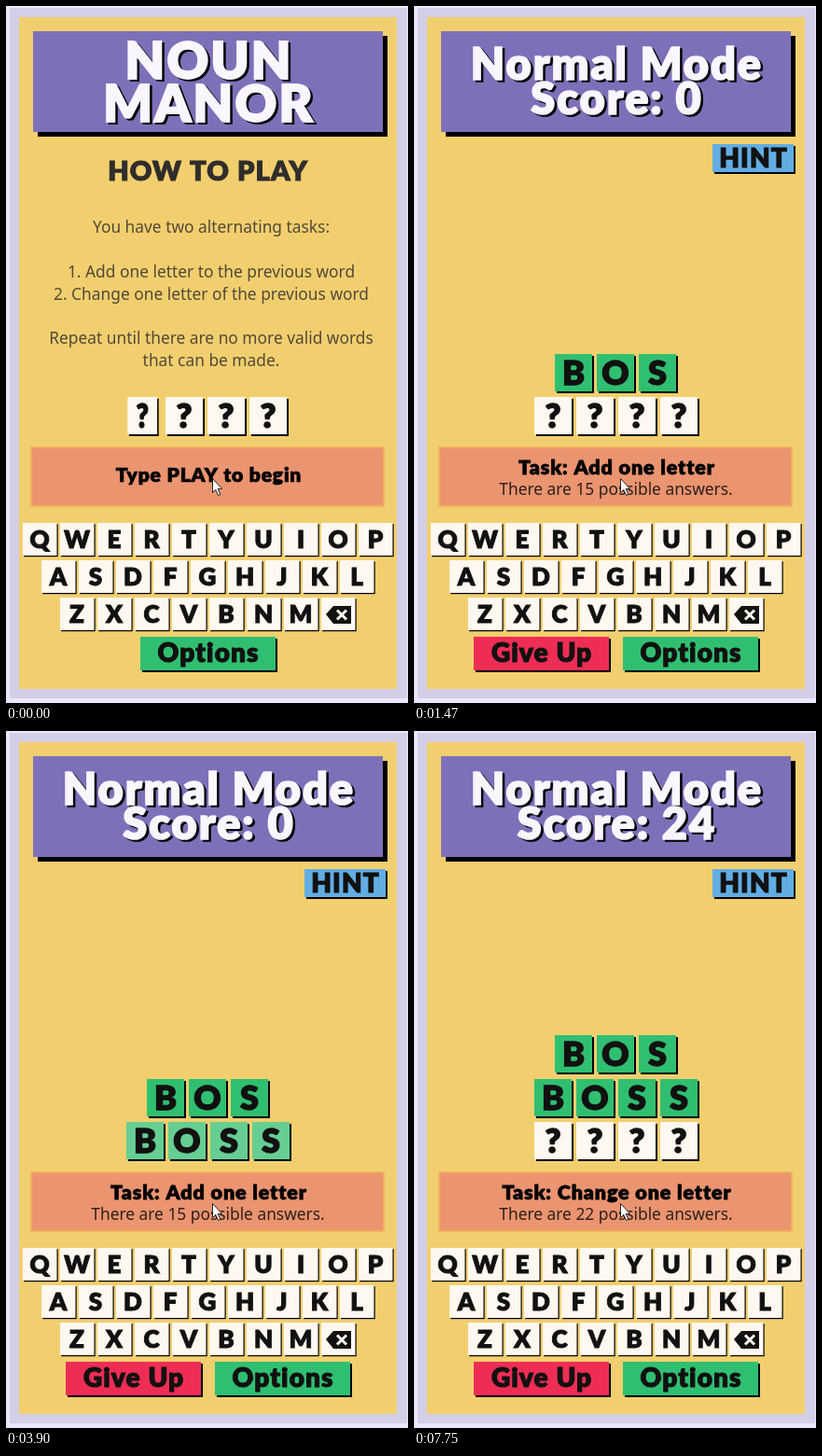
These frames come from a looping animation (431x747 px, 8000 ms). An HTML page with a canvas:

```html
<!DOCTYPE html>
<html lang="en">
<head>
<meta charset="utf-8">
<title>Word game</title>
<style>
  html, body { margin: 0; width: 100%; height: 100%; overflow: hidden; background: #ece7fc; }
  canvas { display: block; }
</style>
</head>
<body>
<canvas id="stage" width="431" height="747"></canvas>
<script>
const ctx = document.getElementById('stage').getContext('2d');
const LOOP = 8000, FLIP = 270, APPEAR = 190;
const GAME_START = 1280, SECOND_TASK = 3990;
const CREAM = [255, 248, 240], GREEN = [48, 191, 113];
const INK = '#111';

const clamp = v => Math.max(0, Math.min(1, v));
const progress = (t, start, length) => clamp((t - start) / length);
const mix = (a, b, k) => `rgb(${a.map((v, i) => Math.round(v + (b[i] - v) * k))})`;
const cream = mix(CREAM, GREEN, 0), green = mix(CREAM, GREEN, 1);

function box(x, y, w, h, fill, shadow = 0) {
  if (shadow) {
    ctx.fillStyle = '#000';
    ctx.fillRect(x + shadow, y + shadow, w, h);
  }
  ctx.fillStyle = fill;
  ctx.fillRect(x, y, w, h);
}

// The thin outline gives the lettering its extra weight.
function heavy(text, x, y, size, fill = INK) {
  const spacing = size * 0.04;
  ctx.font = `900 ${size}px Lato, sans-serif`;
  ctx.letterSpacing = spacing + 'px';
  ctx.fillStyle = ctx.strokeStyle = fill;
  ctx.lineWidth = size * 0.035;
  ctx.lineJoin = 'miter';
  ctx.miterLimit = 3;
  ctx.fillText(text, x + spacing / 2, y);
  ctx.strokeText(text, x + spacing / 2, y);
}

function plain(text, x, y, fill) {
  ctx.font = '17.35px "Noto Sans", sans-serif';
  ctx.letterSpacing = '0px';
  ctx.fillStyle = fill;
  ctx.fillText(text, x, y);
}

function polygon(points, fill, stroke) {
  ctx.beginPath();
  points.forEach(([x, y]) => ctx.lineTo(x, y));
  ctx.closePath();
  ctx.fillStyle = fill;
  ctx.fill();
  if (stroke) {
    ctx.strokeStyle = stroke;
    ctx.lineWidth = 1;
    ctx.stroke();
  }
}

function header(lines, size, baselines) {
  box(29, 27, 375, 108, '#7d70b9', 5);
  lines.forEach((line, i) => {
    heavy(line, 219, baselines[i] + 2, size, '#000');
    heavy(line, 216.5, baselines[i], size, '#faf6ff');
  });
}

function button(label, x, fill) {
  box(x, 676, 145, 36, fill, 2);
  heavy(label, x + 72.5, 703, 28);
}

function panel() {
  box(26, 472, 380, 65, '#f1b15f');
  box(28, 474, 376, 61, '#eb9470');
}

function tile(x, y, letter, fill, scale = 1) {
  ctx.save();
  ctx.translate(x + 21, y);
  ctx.scale(Math.max(scale, 0.02), 1);
  box(-21, 0, 40, 40, fill, 2);
  heavy(letter, -1, 33, 36);
  ctx.restore();
}

const row = (word, x, y, fill) =>
  [...word].forEach((letter, i) => tile(x + 45 * i, y, letter, fill));

// Each tile turns from "?" to its letter; an optional time turns it back.
function inputRow(t, x, word, starts, { appear = 1, tint = 0, back = Infinity } = {}) {
  for (let i = 0; i < 4; i++) {
    const start = starts[i] ?? Infinity;
    const on = progress(t, start, FLIP), off = progress(t, back, FLIP);
    const turn = t >= back ? off : on;
    const letter = on >= 0.5 && off < 0.5 ? word[i] : '?';
    const scale = Math.abs(Math.cos(Math.PI * turn)) * appear;
    tile(x + 45 * i, 419, letter, mix(CREAM, GREEN, tint), scale);
  }
}

function keyboard() {
  ['QWERTYUIOP', 'ASDFGHJKL', 'ZXCVBNM<'].forEach((keys, r) => {
    const y = 554 + 40 * r;
    [...keys].forEach((key, i) => {
      const x = 18 + 20 * r + 40 * i;
      box(x, y, 36.5, 35, cream, 1.2);
      if (key !== '<') heavy(key, x + 18, y + 27, 26);
      else backspace(x + 5, y + 9);
    });
  });
}

function backspace(x, y) {
  polygon([[x, y + 9], [x + 8, y], [x + 27, y], [x + 27, y + 19], [x + 8, y + 19]], INK);
  ctx.strokeStyle = cream;
  ctx.lineWidth = 3;
  ctx.beginPath();
  for (const d of [-1, 1]) {
    ctx.moveTo(x + 12, y + 9.5 - 5 * d);
    ctx.lineTo(x + 22, y + 9.5 + 5 * d);
  }
  ctx.stroke();
}

function cursor() {
  polygon([[221.5, 506.5], [221.5, 521.5], [224.8, 518.5], [227.5, 524.5],
    [229.8, 523.5], [227.2, 517.5], [231.5, 517.3]], '#fff', '#222');
}

function intro(t) {
  header(['NOUN', 'MANOR'], 55, [78, 124]);
  heavy('HOW TO PLAY', 216, 187, 29, '#302d2c');
  [['You have two alternating tasks:', 243],
   ['1. Add one letter to the previous word', 291],
   ['2. Change one letter of the previous word', 315],
   ['Repeat until there are no more valid words', 362],
   ['that can be made.', 386]].forEach(([line, y]) => plain(line, 220, y, '#514939'));
  inputRow(t, 126, 'PLAY', [-55, 480, 680, 875], { tint: progress(t, 1080, 130) });
  panel();
  heavy('Type PLAY to begin', 217, 510, 21, '#000');
  button('Options', 144, '#30bf71');
}

function game(t) {
  const second = t >= SECOND_TASK;
  const appear = progress(t, second ? SECOND_TASK : GAME_START, APPEAR);
  const grow = Math.sin(appear * Math.PI / 2);
  header(['Normal Mode', `Score: ${second ? 24 : 0}`], 47, [79, 116]);
  box(320, 148, 87, 30, '#62ade3', 2);
  heavy('HINT', 363.5, 173, 28);

  if (second) {
    row('BOS', 151, 326, green);
    row('BOSS', 129, 373, green);
    inputRow(t, 129, 'L', [6730], { appear: grow, back: 7480 });
  } else {
    row('BOS', 151, 373, mix(CREAM, GREEN, appear));
    inputRow(t, 129, 'BOSS', [2880, 3115, 3350, 3585],
      { appear: grow, tint: progress(t, 3790, 150) });
  }

  panel();
  heavy(`Task: ${second ? 'Change' : 'Add'} one letter`, 217, 502, 21.5, '#000');
  plain(`There are ${second ? 22 : 15} possible answers.`, 216.5, 524, '#2d201b');
  button('Give Up', 64, '#ee2d55');
  button('Options', 224, '#30bf71');
}

function draw(now) {
  const t = now % LOOP;
  ctx.textAlign = 'center';
  box(0, 0, 431, 747, '#ece7fc');
  box(4, 2, 426, 740, '#d4cfe8');
  box(14, 12, 405, 720, '#f2cf6e');
  (t < GAME_START ? intro : game)(t);
  keyboard();
  cursor();
  requestAnimationFrame(draw);
}
requestAnimationFrame(draw);
</script>
</body>
</html>
```
